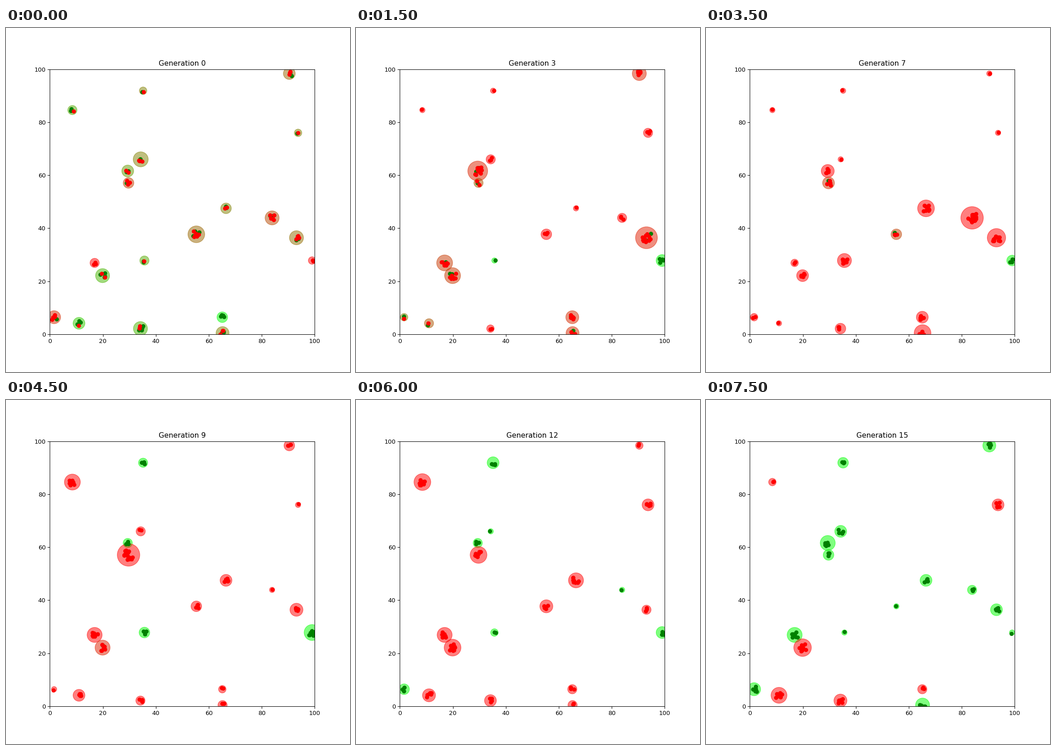
These frames come from a looping animation (748x748 px, 8000 ms). A matplotlib script:

```python
import numpy as np
import matplotlib.pyplot as plt
from matplotlib.animation import FuncAnimation
from matplotlib.patches import Circle

GENERATIONS = 16
POPULATION = 100
SPREAD = 0.4  # how far dots stray from the centre, as a part of the radius

# Each site: x, y, greens and reds at the start
START = np.array([
    (90.4, 98.4, 2, 3), (35.2, 91.9, 1, 1), (8.5, 84.6, 2, 1),
    (93.7, 76.0, 1, 1), (34.3, 66.0, 4, 4), (29.4, 61.6, 3, 2),
    (29.7, 57.1, 1, 3), (66.5, 47.5, 2, 2), (83.9, 43.9, 2, 5),
    (55.3, 37.7, 4, 6), (93.1, 36.4, 3, 4), (35.7, 27.8, 2, 1),
    (99.0, 27.8, 0, 2), (16.9, 26.9, 0, 3), (19.9, 22.1, 5, 2),
    (1.6, 6.4, 1, 5), (11.0, 4.1, 4, 1), (34.2, 2.1, 5, 2),
    (65.1, 6.4, 4, 0), (65.2, 0.4, 3, 3),
])
SITES = START[:, :2]

# Generation from which the listed sites are purely green
TAKEOVER = {2: [12], 9: [1, 5, 11], 12: [4, 8, 15], 14: [0, 6, 7, 9, 10, 13, 19]}


def groups(gen, rng):
    """Group sizes and their green counts in one generation."""
    if gen == 0:
        greens, reds = START[:, 2:].astype(int).T
        return greens + reds, greens
    weights = rng.dirichlet(np.full(len(SITES), 1.5))
    sizes = 1 + rng.multinomial(POPULATION - len(SITES), weights)
    # Reds crowd out greens in mixed groups, until pure greens spread
    greens = rng.binomial(sizes, 0.5 * np.exp(-gen / 2.5))
    for first, sites in TAKEOVER.items():
        if gen >= first:
            greens[sites] = sizes[sites]
    return sizes, greens


fig, ax = plt.subplots(figsize=(8, 8), dpi=93.5)
ax.set(xlim=(0, 100), ylim=(0, 100), aspect="equal")
title = ax.set_title("Generation 0")
discs = [ax.add_patch(Circle(site, 1, alpha=0.5)) for site in SITES]
green_dots, = ax.plot([], [], "o", color="green")
red_dots, = ax.plot([], [], "o", color="red")


def update(gen):
    rng = np.random.default_rng(40 + gen)
    sizes, greens = groups(gen, rng)
    green_pts, red_pts = [], []
    for site, disc, n, g in zip(SITES, discs, sizes, greens):
        radius = np.sqrt(n)
        disc.set_radius(radius)
        disc.set_color((1 - g / n, g / n, 0))
        pts = site + radius * rng.uniform(-SPREAD, SPREAD, (n, 2))
        green_pts.extend(pts[:g])
        red_pts.extend(pts[g:])
    for line, pts in ((green_dots, green_pts), (red_dots, red_pts)):
        line.set_data(*np.reshape(pts, (-1, 2)).T)
    title.set_text(f"Generation {gen}")
    return [*discs, green_dots, red_dots, title]


anim = FuncAnimation(fig, update, frames=GENERATIONS, interval=500, repeat=True)
plt.show()
```
